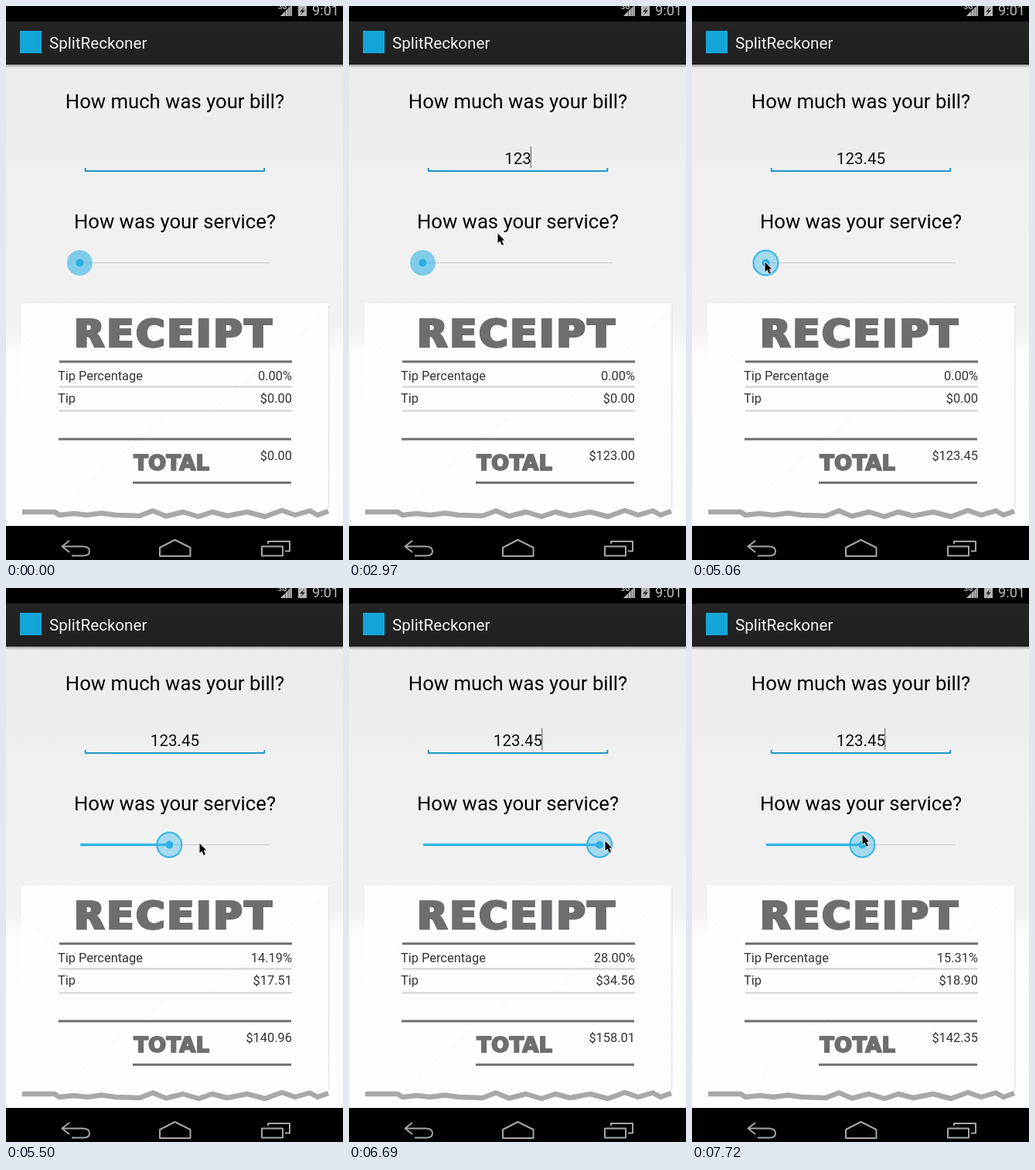
Animation, 436 px wide and 715 px high, one loop 8 s. Source, as an HTML page with a canvas:

```html
<!DOCTYPE html>
<html lang="en">
<head>
<meta charset="utf-8">
<title>Tip screen</title>
<style>
  html, body { margin: 0; width: 100%; height: 100%; overflow: hidden; background: #000; }
  canvas { display: block; width: 436px; height: 715px; }
</style>
</head>
<body>
<canvas id="stage"></canvas>
<script>
const W = 436, H = 715, LOOP = 8000, TICK = 148.4;
const BLUE = '#33b5e5', INK = '#6d6e70';
const UI = 'Roboto, sans-serif', HEAVY = '"DejaVu Sans", sans-serif';

const canvas = document.getElementById('stage');
const ctx = canvas.getContext('2d');
const dpr = window.devicePixelRatio || 1;
canvas.width = W * dpr;
canvas.height = H * dpr;
ctx.scale(dpr, dpr);

// Keys are [tick, value...]; the screen refreshes once per tick.
const typed = [[0, ''], [12, '1'], [13, '12'], [14, '123'], [21, '123.'], [23, '123.4'], [24, '123.45']];
const caretFlips = [3, 7, 10, 17, 20, 28, 31, 34, 38, 41, 45, 48, 51];
const pointerPath = [
  [5, 224, 377], [6, 202, 320], [7, 192, 293], [27, 192, 293], [28, 179, 298],
  [30, 57, 345], [32, 90, 330], [34, 94, 330], [35, 112, 329], [37, 250, 329],
  [39, 292, 329], [42, 323, 326], [44, 331, 326], [45, 331, 326], [47, 283, 324],
  [48, 249, 324], [49, 228, 322], [51, 220, 318]
];
const tipPath = [
  [35, 0], [36, 4.3], [37, 14.19], [38, 19.5], [40, 24.6], [42, 26.76], [44, 28],
  [45, 28], [47, 24.6], [48, 20.86], [49, 18.2], [50, 16.3], [51, 15.31]
];
const PRESS = 34, POINTER_IN = 5;

function held(keys, n) {
  return keys.filter(k => k[0] <= n).pop()[1];
}

function sample(keys, n) {
  if (n <= keys[0][0]) return keys[0].slice(1);
  const i = keys.findIndex(k => k[0] > n);
  if (i < 0) return keys[keys.length - 1].slice(1);
  const a = keys[i - 1], b = keys[i], u = (n - a[0]) / (b[0] - a[0]);
  return a.slice(1).map((v, j) => v + (b[j + 1] - v) * u);
}

function rect(x, y, w, h, fill) {
  ctx.fillStyle = fill;
  ctx.fillRect(x, y, w, h);
}

function disc(x, y, r, fill) {
  ctx.beginPath();
  ctx.arc(x, y, r, 0, Math.PI * 2);
  ctx.fillStyle = fill;
  ctx.fill();
}

function label(str, x, y, size, color, align = 'left') {
  ctx.font = `${size}px ${UI}`;
  ctx.textAlign = align;
  ctx.fillStyle = color;
  ctx.fillText(str, x, y);
}

// Extra-black lettering: outlined and doubled sideways.
function heavy(str, x, y, size, weight, smear, spacing) {
  ctx.font = `bold ${size}px ${HEAVY}`;
  ctx.textAlign = 'left';
  ctx.letterSpacing = spacing + 'px';
  ctx.fillStyle = ctx.strokeStyle = INK;
  ctx.lineWidth = weight;
  ctx.lineJoin = 'miter';
  for (const dx of [0, smear]) {
    ctx.fillText(str, x + dx, y);
    ctx.strokeText(str, x + dx, y);
  }
  ctx.letterSpacing = '0px';
}

function stroke(d, color, width) {
  ctx.strokeStyle = color;
  ctx.lineWidth = width;
  ctx.lineJoin = 'round';
  ctx.stroke(new Path2D(d));
}

function shade(y0, y1, stops) {
  const g = ctx.createLinearGradient(0, y0, 0, y1);
  stops.forEach(([y, c]) => g.addColorStop((y - y0) / (y1 - y0), c));
  rect(0, y0, W, y1 - y0, g);
}

function drawBars() {
  rect(0, 0, W, 20, '#000');
  ctx.font = `bold 9px ${UI}`;
  ctx.textAlign = 'left';
  ctx.fillStyle = '#bbb';
  ctx.fillText('3G', 352, 4);
  ctx.fillStyle = '#555';
  ctx.fill(new Path2D('M355 13H370V-2Z'));
  ctx.fillStyle = '#bbb';
  ctx.fill(new Path2D('M355 13H361V7ZM362 13H364.5V3.5L362 6ZM365.5 13H367.5V.5L365.5 2.5ZM368.5 13H370V-2L368.5 -.5Z'));
  rect(378, 0, 11, 13, '#b5b5b5');
  ctx.fillStyle = '#222';
  ctx.fill(new Path2D('M386 1L380 7.5H383.5L381 12L387 5.5H383.5Z'));
  label('9:01', 396, 12, 18.2, '#bbb');

  shade(20, 75, [[20, '#242424'], [75, '#202020']]);
  rect(0, 74, W, 1.5, '#141414');
  rect(18, 32, 28, 29, '#13a5d8');
  label('SplitReckoner', 56, 55, 20.6, '#f3f3f3');

  rect(0, 671, W, 44, '#000');
  stroke('M82 690L72.5 697.5L82 705M73 697.5H99Q108 697.5 108 703.5Q108 709.5 100 709.5H85', '#a6a6a6', 2);
  stroke('M199 699L218.5 689L238.5 699V710H199Z', '#a6a6a6', 2);
  stroke('M331 697.5H358V709.5H331ZM339 694V691H367V703.5H361', '#a6a6a6', 2);
}

function drawPage() {
  shade(75, 671, [
    [75, '#ececec'], [185, '#eeeeee'], [215, '#f0f0f0'],
    [415, '#f2f2f2'], [450, '#fdfdfd'], [671, '#fefefe']
  ]);
  shade(75, 80, [[75, 'rgba(0,0,0,.35)'], [80, 'rgba(0,0,0,0)']]);
  label('How much was your bill?', 218.5, 132, 25.7, '#000', 'center');
  label('How was your service?', 218.5, 287, 25.7, '#000', 'center');
  stroke('M102.75 209V213H334.25V209', '#1f97c5', 2);
}

function drawReceipt() {
  rect(20, 384, 398, 270, '#fefefe');
  rect(417, 386, 1.5, 262, '#e6e6e6');
  stroke('M20 424L69 466M418 392L262 526M206 532L90 628', '#f6f6f6', 1);
  heavy('RECEIPT', 87.3, 440.3, 50, 1.8, 2.5, 3.6);
  heavy('TOTAL', 165, 599, 27, 1.3, 0.8, 0.4);
  rect(69, 457.5, 301, 3, INK);
  rect(69, 490.5, 301, 2, '#d2d2d2');
  rect(69, 521.5, 301, 2, '#d2d2d2');
  rect(68, 557.5, 301, 3, INK);
  rect(164, 613.7, 205, 3, INK);
  stroke('M21 653H63L69 657L88 655L105 657L124 654.5L142 657L173 658L190 651.5L207 658.5L229 653L249 659L267 653L286 658L312 653L335 659L357 651L374 657L393 651.5L403 657L417 652', '#a7a8aa', 6.5);
  label('Tip Percentage', 67, 483, 16.4, '#333');
  label('Tip', 67, 511.5, 16.4, '#333');
}

function drawBill(text, caretOn) {
  label(text, 218.5, 203.5, 20.6, '#111', 'center');
  const half = ctx.measureText(text).width / 2;
  if (caretOn) rect(217.4 + half, 181, 1.3, 28, '#777');
}

function drawSlider(pct, pressed) {
  const x = 95.4 + pct * 245 / 30;
  rect(96, 331, 245, 1, '#cbcbcb');
  if (pct > 0) rect(96, 329.7, x - 96, 3.4, BLUE);
  disc(x, 331.5, 16.5, `rgba(51,181,229,${pressed ? 0.4 : 0.6})`);
  if (pressed) {
    ctx.beginPath();
    ctx.arc(x, 331.5, 16, 0, Math.PI * 2);
    ctx.strokeStyle = BLUE;
    ctx.lineWidth = 2;
    ctx.stroke();
  }
  disc(x, 331.5, 5, '#2bb0e2');
}

function drawSums(bill, pct) {
  const tip = Math.floor(bill * pct + 1e-6) / 100;
  const rows = [[pct.toFixed(2) + '%', 483], ['$' + tip.toFixed(2), 511.5], ['$' + (bill + tip).toFixed(2), 586]];
  rows.forEach(([s, y]) => label(s, 370, y, 16.4, '#333', 'right'));
}

function drawPointer(x, y) {
  const arrow = new Path2D('M.5 .5V13L3.4 10.4L5.7 15.8L8 14.8L5.7 9.5H9.3Z');
  ctx.save();
  ctx.translate(x, y);
  ctx.strokeStyle = '#fff';
  ctx.lineWidth = 1.6;
  ctx.stroke(arrow);
  ctx.fillStyle = '#000';
  ctx.fill(arrow);
  ctx.restore();
}

function draw(ms) {
  const n = Math.floor((ms + 4) / TICK);
  const bill = held(typed, n);
  const pct = sample(tipPath, n)[0];
  const caretOn = caretFlips.filter(k => k <= n).length % 2 === 1;
  drawPage();
  drawBars();
  drawReceipt();
  drawBill(bill, caretOn);
  drawSlider(pct, n >= PRESS);
  drawSums(Number(bill), pct);
  if (n >= POINTER_IN) drawPointer(...sample(pointerPath, n));
}

const start = performance.now();
function loop() {
  draw((performance.now() - start) % LOOP);
  requestAnimationFrame(loop);
}
loop();
</script>
</body>
</html>
```
